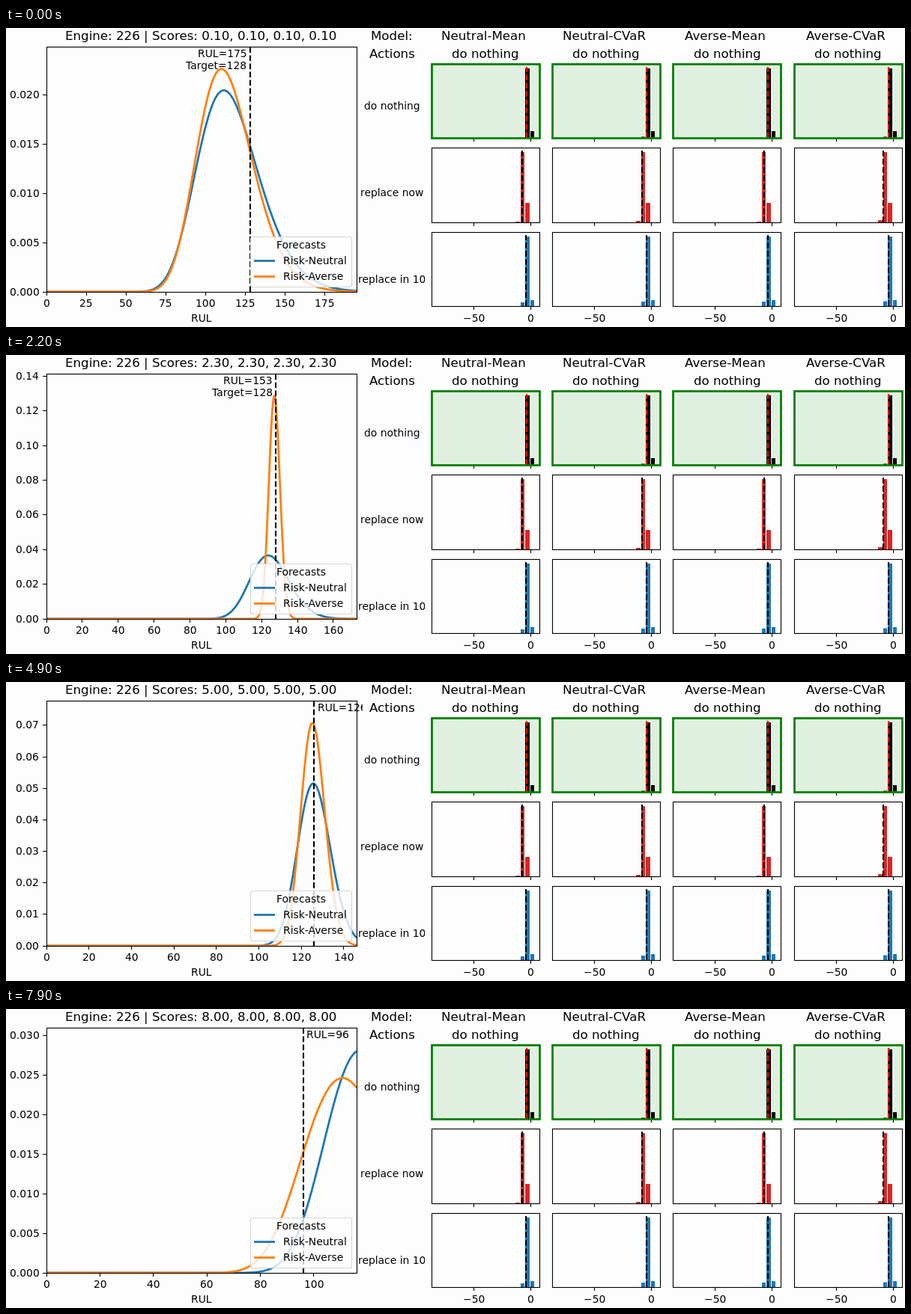
An HTML page with a canvas for the animation above (8 s loop, 1200 by 400 pixels).

```html
<!DOCTYPE html>
<html lang="en">
<head>
<meta charset="utf-8">
<title>Remaining useful life forecasts</title>
<style>
html, body { margin: 0; width: 100%; height: 100%; overflow: hidden; background: #fdfdfd; }
canvas { display: block; width: 1200px; height: 400px; }
</style>
</head>
<body>
<canvas id="stage" width="1200" height="400"></canvas>
<script>
const ctx = document.getElementById('stage').getContext('2d');
const STEP = 100, STEPS = 80, TARGET = 128;
const PAPER = '#fdfdfd', BLUE = '#1f77b4', ORANGE = '#ff7f0e', RED = '#d62728';
const SMALL = 13.89, LARGE = 16.67;
const plot = { x: 54, y: 25, w: 414, h: 328 };
const base = plot.y + plot.h;

// Log-normal forecasts: step, neutral mode and sigma, averse mode and sigma
const KEYS = [
  [0, 111.5, .172, 110, .158],
  [7, 121, .1124, 127.3, .0271],
  [22, 123.7, .0878, 127.1, .0244],
  [38, 124.8, .0788, 127.8, .02355],
  [49, 125.6, .0615, 125.2, .045],
  [69, 118.4, .1198, 116.7, .118],
  [79, 117.5, .1198, 110.7, .145]
];

// Text starts on a whole pixel, whatever its alignment
function text(str, x, y, size = SMALL, align = 'center') {
  ctx.font = size + 'px "DejaVu Sans", sans-serif';
  ctx.fillStyle = '#000';
  const shift = { left: 0, center: .5, right: 1 }[align];
  ctx.fillText(str, Math.round(x - ctx.measureText(str).width * shift), y);
}

function line(x1, y1, x2, y2, color = '#000', width = 1.11, dash = []) {
  ctx.strokeStyle = color;
  ctx.lineWidth = width;
  ctx.setLineDash(dash);
  ctx.beginPath();
  ctx.moveTo(x1, y1);
  ctx.lineTo(x2, y2);
  ctx.stroke();
  ctx.setLineDash([]);
}

function frame(x, y, w, h, color = '#000', width = 1.11) {
  ctx.strokeStyle = color;
  ctx.lineWidth = width;
  ctx.strokeRect(x, y, w, h);
}

const dashed = (x, bottom, top, color) => line(x, bottom, x, top, color, 2.08, [7.7, 3.33]);

function clipped(x, y, w, h, draw) {
  ctx.save();
  ctx.beginPath();
  ctx.rect(x, y, w, h);
  ctx.clip();
  draw();
  ctx.restore();
}

function forecasts(n) {
  let i = 0;
  while (i < KEYS.length - 2 && n >= KEYS[i + 1][0]) i++;
  const a = KEYS[i], b = KEYS[i + 1], p = (n - a[0]) / (b[0] - a[0]);
  return [1, 3].map(k => {
    const mode = a[k] + (b[k] - a[k]) * p;
    const sigma = a[k + 1] * Math.pow(b[k + 1] / a[k + 1], p);
    const peak = Math.exp(-sigma * sigma / 2) / (mode * sigma * Math.sqrt(2 * Math.PI));
    return { mode, sigma, peak };
  });
}

// Nice tick step giving at most nine intervals
function tickStep(range) {
  const raw = range / 9, mag = Math.pow(10, Math.floor(Math.log10(raw)));
  return mag * [1, 2, 2.5, 5, 10].find(s => s * mag >= raw - 1e-9);
}

function drawCurve(f, color, xMax, yMax) {
  ctx.beginPath();
  for (let px = 0; px <= plot.w; px += .5) {
    const u = Math.log(Math.max(px / plot.w * xMax, 1e-6) / f.mode) / f.sigma;
    ctx.lineTo(plot.x + px, base - f.peak * Math.exp(-u * u / 2) / yMax * plot.h);
  }
  ctx.strokeStyle = color;
  ctx.lineWidth = 2.78;
  ctx.lineJoin = 'round';
  ctx.stroke();
}

function drawLegend() {
  ctx.beginPath();
  ctx.roundRect(326.5, 279.5, 135, 67, 3);
  ctx.fillStyle = 'rgba(255,255,255,.8)';
  ctx.fill();
  ctx.strokeStyle = '#d6d6d0';
  ctx.lineWidth = 1.2;
  ctx.stroke();
  text('Forecasts', 393.5, 295);
  [['Risk-Neutral', BLUE], ['Risk-Averse', ORANGE]].forEach(([name, color], i) => {
    line(331, 311.5 + 21 * i, 359, 311.5 + 21 * i, color, 2.78);
    text(name, 370, 316 + 21 * i, SMALL, 'left');
  });
}

function drawForecast(n) {
  const rul = 175 - n, xMax = rul + 20, early = rul > TARGET;
  const [neutral, averse] = forecasts(n);
  const yMax = 1.1 * Math.max(neutral.peak, averse.peak);
  const toX = v => plot.x + v / xMax * plot.w;
  const mark = toX(Math.min(rul, TARGET));

  clipped(plot.x, plot.y, plot.w, plot.h, () => {
    drawCurve(neutral, BLUE, xMax, yMax);
    drawCurve(averse, ORANGE, xMax, yMax);
    dashed(Math.round(mark), base, plot.y);
  });

  const dx = tickStep(xMax), dy = tickStep(yMax);
  for (let v = 0; v <= xMax; v += dx) {
    const x = Math.floor(toX(v)) + .5;
    line(x, base, x, base + 5);
    text(v, toX(v), 373);
  }
  const digits = Math.max(2, [2, 3, 4].find(d => Math.abs(dy - dy.toFixed(d)) < 1e-9));
  for (let i = 0; i * dy <= yMax; i++) {
    const y = Math.floor(base - i * dy / yMax * plot.h);
    line(49, y + .5, plot.x, y + .5);
    text((i * dy).toFixed(digits), 44.3, y + 5, SMALL, 'right');
  }
  frame(plot.x + .5, plot.y + .5, plot.w, plot.h);

  clipped(0, 0, 476, 400, () => {
    if (early) {
      text('RUL=' + rul, mark - 4.6, 39, SMALL, 'right');
      text('Target=' + TARGET, mark - 4.6, 55, SMALL, 'right');
    } else {
      text('RUL=' + rul, mark + 4.4, 39, SMALL, 'left');
    }
  });
  drawLegend();
  text('RUL', 261, 393);
  const score = ((n + 1) / 10).toFixed(2);
  text('Engine: 226 | Scores: ' + Array(4).fill(score).join(', '), 260.5, 16, LARGE);
}

const MODELS = ['Neutral-Mean', 'Neutral-CVaR', 'Averse-Mean', 'Averse-CVaR'];
// Bars are [left, top] from the panel's left edge and the stage top;
// tails and marks vary by model.
const ROWS = [
  { y: 48, h: 99, color: '#000', mark: 'red', bars: [[125.3, 54], [131.9, 138]],
    tail: 118.7, tops: [147, 145.5, 147, 145.5], marks: [127, 126, 127, 126] },
  { y: 160, h: 100, color: RED, mark: '#000', bars: [[118.7, 166], [125.3, 234]],
    tail: 112.2, tops: [259, 258, 259, 257], marks: [121, 120, 122, 119] },
  { y: 273, h: 99, color: BLUE, mark: '#000', bars: [[125.3, 279], [131.9, 364]],
    tail: 118.7, tops: [367, 366, 366, 365.5], marks: [126, 126, 127, 126] }
];

function drawPanel(row, r, col) {
  const x = Math.floor(568.3 + 161.25 * col), bottom = row.y + row.h;
  const bar = (left, top) => {
    const start = Math.round(left);
    ctx.fillRect(x + start, top, Math.round(left + 5.4) - start, bottom - top);
  };
  if (!r) {
    ctx.fillStyle = '#e0f0e0';
    ctx.fillRect(x, row.y, 144, row.h);
  }
  ctx.fillStyle = row.color;
  row.bars.forEach(b => bar(...b));
  bar(row.tail, row.tops[col]);
  dashed(x + row.marks[col], bottom, row.y + 4, row.mark);
  for (const [label, dx] of [['−50', 56], ['0', 132.5]]) {
    const tx = Math.floor(x + dx) + .5;
    line(tx, bottom, tx, bottom + 5);
    if (r === 2) text(label, tx, 393);
  }
  frame(x + .5, row.y + .5, 144, row.h, ...(r ? [] : ['#008000', 2.78]));
}

function drawPanels() {
  text('Model:', 515, 16, LARGE);
  text('Actions', 515, 40, LARGE);
  clipped(0, 0, 559, 400, () =>
    ['do nothing', 'replace now', 'replace in 10'].forEach((s, i) => text(s, 515, 109 + 116 * i)));
  MODELS.forEach((name, col) => {
    const mid = 640 + 161.25 * col;
    text(name, mid - 2.65, 16, LARGE);
    text('do nothing', mid, 40, LARGE);
    ROWS.forEach((row, r) => drawPanel(row, r, col));
  });
}

let shown = -1;
function render() {
  const n = Math.floor(performance.now() / STEP) % STEPS;
  if (n !== shown) {
    shown = n;
    ctx.fillStyle = PAPER;
    ctx.fillRect(0, 0, 1200, 400);
    drawForecast(n);
    drawPanels();
  }
  requestAnimationFrame(render);
}
render();
</script>
</body>
</html>
```
